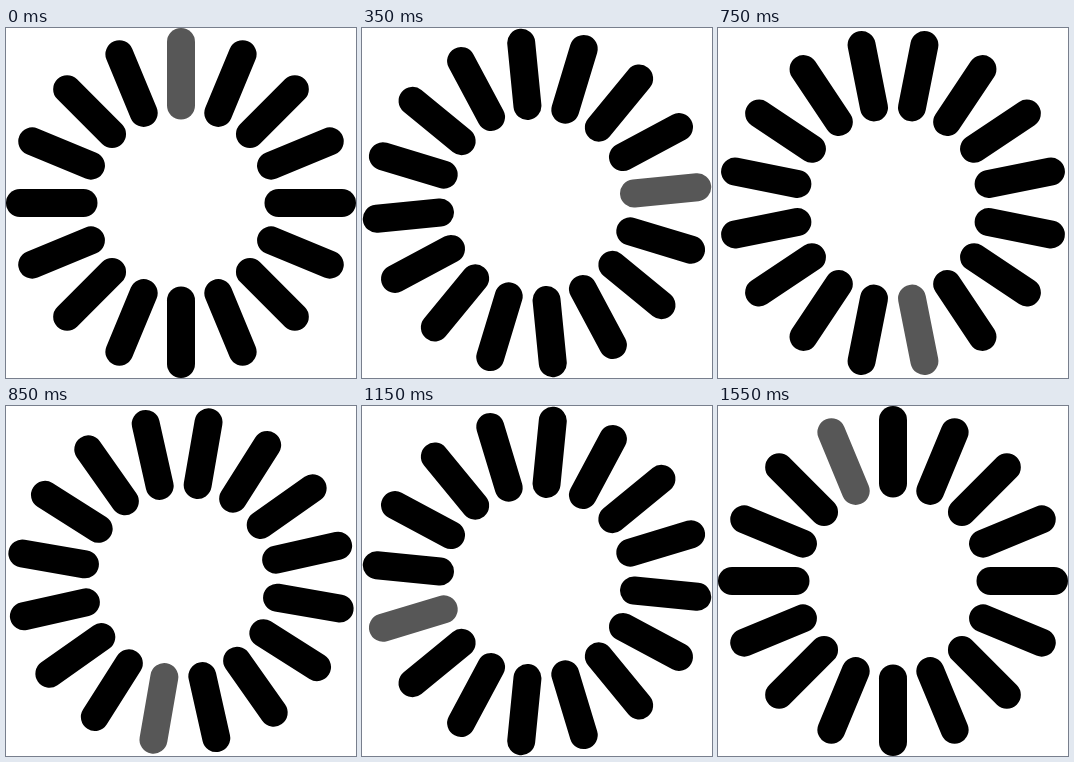
Animation of 350x350 px, one loop 1.6 s. Source, as an HTML page:

```html
<!DOCTYPE html>
<html lang="en">
<head>
<meta charset="utf-8">
<title>Spinner</title>
<style>
  html, body { margin: 0; width: 100%; height: 100%; overflow: hidden; background: #fff; }
  svg { display: block; width: 100vw; height: 100vh; }
  line { stroke: #000; stroke-width: 28; stroke-linecap: round; }
  line:first-child { stroke: #575757; }
</style>
</head>
<body>
<svg viewBox="0 0 350 350"><g id="wheel"></g></svg>
<script>
  const LOOP = 1600, STEP = 100, BARS = 16;
  const SPACING = 360 / BARS;
  // The wheel stops one bar short of a full turn at the last step
  const STEP_ANGLE = (360 - SPACING) / BARS;
  const wheel = document.getElementById('wheel');

  wheel.innerHTML = Array.from({ length: BARS }, (_, i) =>
    `<line x1="175" y1="14" x2="175" y2="77.5" transform="rotate(${i * SPACING} 175 175)"/>`
  ).join('');

  function draw() {
    const time = performance.now() % LOOP;
    const step = Math.floor((time + STEP / 2) / STEP);
    wheel.setAttribute('transform', `rotate(${step * STEP_ANGLE} 175 175)`);
    requestAnimationFrame(draw);
  }
  draw();
</script>
</body>
</html>
```
